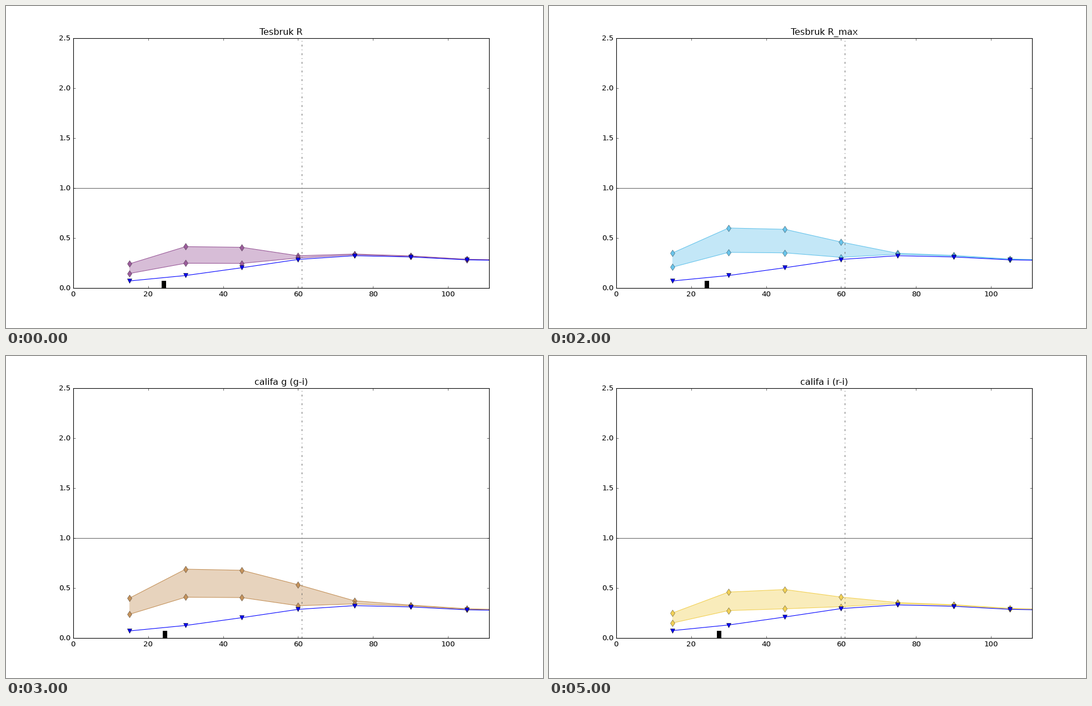
These frames come from a looping animation (966 px wide and 580 px high, 6 s). A matplotlib script:

```python
import matplotlib.pyplot as plt
import numpy as np
from matplotlib.animation import FuncAnimation

plt.style.use("classic")
plt.rcParams.update({"font.family": "DejaVu Sans", "text.hinting": "native"})

DPI = 80
RADII = np.arange(15, 121, 15)
GAS = np.array([0.068, 0.1225, 0.2005, 0.2835, 0.321, 0.3085, 0.2795, 0.2705])
H_MIN, H_MAX = 24.2, 27.5
LOW_RATIO = 0.585
COUPLING = 0.085

# title, colour, disc scale length, stellar amplitude
MODELS = [
    ("Tesbruk R", "#9b5c9b", 24.2, 0.683),
    ("Tesbruk B", "#4b7f50", 27.5, 0.587),
    ("Tesbruk R_max", "#69c5ec", 24.2, 1.0),
    ("califa g (g-i)", "#c5935c", 24.5, 1.133),
    ("califa r (g-r)", "#edb1b7", 25.8, 0.797),
    ("califa i (r-i)", "#f2d156", 27.5, 0.655),
]

fig = plt.figure(figsize=(966 / DPI, 580 / DPI), dpi=DPI, facecolor="white")
fig.subplots_adjust(left=0.125, right=0.9, bottom=0.125, top=0.9)
ax = fig.add_subplot()
ax.set_xlim(0, 111)
ax.set_ylim(0, 2.5)
ax.set_autoscale_on(False)

title = ax.set_title("")
ax.axhline(1.0, color="dimgray")
ax.axvline(61, color="dimgray", linestyle="-.")
scale_mark = ax.axvline(0, ymax=0.028, color="black", linewidth=7.2,
                        solid_capstyle="butt")
band, = ax.fill([0, 0, 0], [0, 0, 0], alpha=0.4, linewidth=0)


def marked_line(style, edge):
    line, = ax.plot([], [], style, markersize=8, markeredgewidth=0.5,
                    markeredgecolor=edge)
    return line


upper_line = marked_line("-d", (0, 0, 0, 0.6))
lower_line = marked_line("-d", (0, 0, 0, 0.6))
gas_line = marked_line("b-v", "black")


def gas_profile(h):
    t = (h - H_MIN) / (H_MAX - H_MIN)
    return GAS * (1 + 0.06 * t * np.exp(-RADII / 90))


def star_profile(h, amplitude):
    return 0.00354 * amplitude * RADII**2 * np.exp(-RADII * (1 / h + 0.015))


def combine(stars, gas):
    """The stronger component dominates, the weaker adds a small share."""
    return np.maximum(stars, gas) + COUPLING * np.minimum(stars, gas)


def draw(i):
    name, color, h, amplitude = MODELS[i]
    gas = gas_profile(h)
    stars = star_profile(h, amplitude)
    upper = combine(stars, gas)
    lower = combine(LOW_RATIO * stars, gas)

    title.set_text(name)
    scale_mark.set_xdata([h, h])
    band.set_xy(np.column_stack([np.append(RADII, RADII[::-1]),
                                 np.append(upper, lower[::-1])]))
    band.set_facecolor(color)
    for line, values in ((upper_line, upper), (lower_line, lower)):
        line.set_data(RADII, values)
        line.set_color(color)
        line.set_markerfacecolor(color)
    gas_line.set_data(RADII, gas)
    return title, scale_mark, band, upper_line, lower_line, gas_line


def init():
    return draw(0)


anim = FuncAnimation(fig, draw, frames=len(MODELS), init_func=init,
                     interval=1000, repeat=True, repeat_delay=0, blit=False)
plt.show()
```
